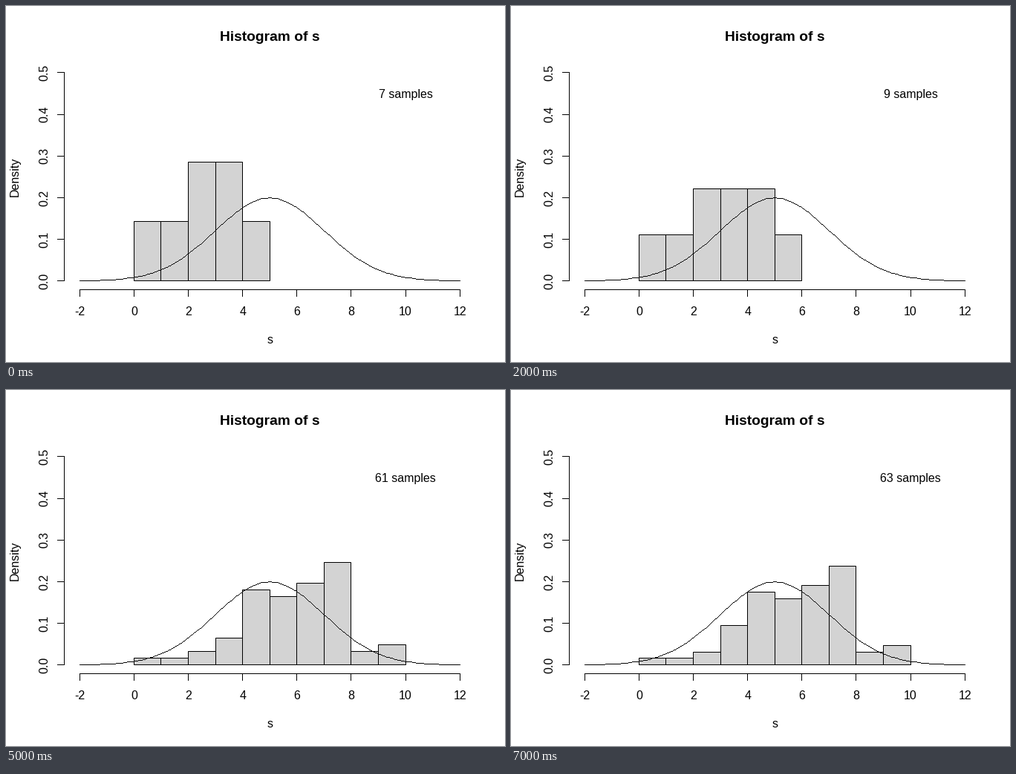
These frames come from a looping animation (672x480 px, 8000 ms). A matplotlib script:

```python
import numpy as np
import matplotlib.pyplot as plt
from matplotlib.animation import FuncAnimation
from matplotlib.patches import Rectangle

plt.rcParams["font.family"] = "Liberation Sans"

W, H, DPI = 672, 480, 96
LINE = 0.75  # one pixel in points

# Plot margins in pixels
LEFT, RIGHT, TOP, BOTTOM = 78.72, 631.68, 78.72, 382.08
TICK = 9.6

# Bin counts at the start of each run, then the bins that gain a sample
RUNS = [
    ([1, 1, 2, 2, 1, 0, 0, 0, 0, 0], [5, 4, 5]),
    ([1, 1, 2, 4, 10, 10, 12, 15, 2, 3], [4, 3, 3]),
]


def px(x):
    return LEFT + (RIGHT - LEFT) * (0.04 + (x + 2) / 14) / 1.08


def py(d):
    return BOTTOM - (BOTTOM - TOP) * (0.04 + d / 0.5) / 1.08


def pixel(v):
    return np.floor(v) + 0.5


def counts_at(frame):
    start, gains = RUNS[frame // 4]
    counts = list(start)
    for b in gains[:frame % 4]:
        counts[b] += 1
    return counts


fig = plt.figure(figsize=(W / DPI, H / DPI), dpi=DPI, facecolor="white")
ax = fig.add_axes([0, 0, 1, 1])
ax.set_xlim(0, W)
ax.set_ylim(H, 0)
ax.axis("off")


def line(x0, y0, x1, y1):
    ax.plot([pixel(x0), pixel(x1)], [pixel(y0), pixel(y1)], color="black",
            lw=LINE, solid_capstyle="projecting", snap=False)


def label(x, y, s, size=12, **kw):
    return ax.text(x, y, s, size=size, color="black", ha="center",
                   va="baseline", rotation_mode="anchor", **kw)


# Axes with ticks
line(px(-2), BOTTOM, px(12), BOTTOM)
for v in range(-2, 13, 2):
    line(px(v), BOTTOM, px(v), BOTTOM + TICK)
    label(px(v), 417, str(v))

line(LEFT, py(0), LEFT, py(0.5))
for k in range(6):
    y = py(k / 10)
    line(LEFT, y, LEFT - TICK, y)
    label(56, y, f"{k / 10:.1f}", rotation=90)

mid_x, mid_y = (LEFT + RIGHT) / 2, (TOP + BOTTOM) / 2
label(mid_x, 47, "Histogram of s", size=14.4, weight="bold")
label(mid_x, 455, "s")
label(17, mid_y, "Density", rotation=90)
caption = label(px(10), 124, "")

# Histogram bars
bars = []
for b in range(10):
    x0, x1 = pixel(px(b)), pixel(px(b + 1))
    bar = Rectangle((x0, pixel(py(0))), x1 - x0, 0, facecolor="#d3d3d3",
                    edgecolor="black", lw=LINE, snap=False, zorder=1)
    bars.append(ax.add_patch(bar))

# Normal density, one pixel per column
xs = np.linspace(-2, 12, 101)
density = np.exp(-((xs - 5) / 2) ** 2 / 2) / (2 * np.sqrt(2 * np.pi))
cols = np.arange(int(px(-2)), int(px(12)) + 1)
rows = np.round(np.interp(cols, np.floor(px(xs)), np.floor(py(density))))
curve = ax.hlines(rows + 0.5, cols, cols + 1, color="black", lw=LINE, zorder=4)
curve.set_snap(False)
ax.set_xlim(0, W)
ax.set_ylim(H, 0)


def update(frame):
    counts = counts_at(frame)
    total = sum(counts)
    for bar, n in zip(bars, counts):
        bar.set_height(pixel(py(n / total)) - pixel(py(0)))
        bar.set_visible(n > 0)
    caption.set_text(f"{total} samples")
    return bars + [caption]


anim = FuncAnimation(fig, update, frames=8, interval=1000, repeat=True)
plt.show()
```
